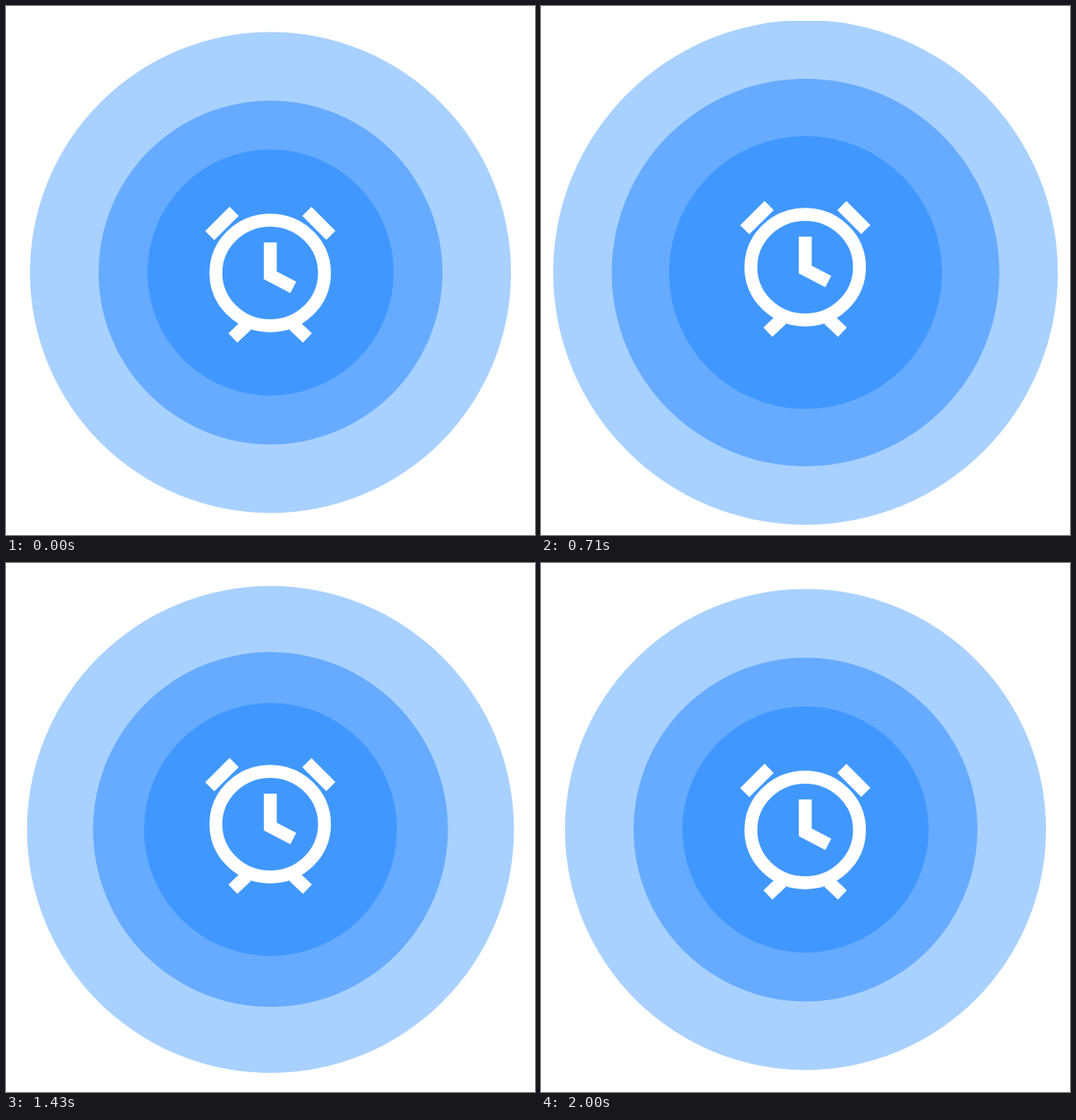
Write an HTML page that moves like this. It is 640 px wide and 640 px high and loops after 3.57 s.

```html
<!DOCTYPE html>
<html lang="en">
<head>
<meta charset="utf-8">
<title>Ringing alarm clock</title>
<style>
  html, body { margin: 0; width: 100%; height: 100%; overflow: hidden; background: #fff; }
  svg { display: block; width: 100%; height: 100%; }
</style>
</head>
<body>
<svg viewBox="0 0 640 640">
  <clipPath id="top"><rect y="18" width="640" height="622"/></clipPath>
  <g id="rings" clip-path="url(#top)">
    <circle cx="320" cy="322.4" fill="#a8d1ff"/>
    <circle cx="320" cy="322.4" fill="#66abff"/>
    <circle cx="320" cy="322.4" fill="#4098ff"/>
  </g>
  <g id="clock" fill="none" stroke="#fff" stroke-width="15.6">
    <ellipse cx="319.6" cy="323" rx="65.7" ry="63.9"/>
    <path d="M319.7 286V325.8L347.6 340.3"/>
    <path d="M274.5 401.7L291 386M364.7 401.7L348.2 386"/>
    <path id="bells" d="M276 248.4L246.5 277.7M364 248.4L393 277.5"/>
  </g>
</svg>
<script>
const LOOP = 3570, STEP = 1000 / 14;
const RADII = [[291, 15], [208, 27.8], [149, 17]]; // rest radius, growth
const rings = document.querySelectorAll('#rings circle');
const clock = document.getElementById('clock');
const bells = document.getElementById('bells');

const clamp = v => Math.max(0, Math.min(1, v));
const pulse = (t, peak) => clamp(1 - Math.abs(t - peak) / 300);
const shaking = (t, start) => {
  const d = t - start;
  return d >= 0 && d < 610 && Math.floor(d / 100) % 2 === 0;
};

function draw(now) {
  // The motion is shown at 14 steps per second
  const t = Math.floor((now % LOOP + 5) / STEP) * STEP;
  const grow = pulse(t, 700) + pulse(t, 1657);
  RADII.forEach(([r, extra], i) => rings[i].setAttribute('r', r + extra * grow));

  const lift = clamp(t / 100) - clamp((t - 1880) / 100);
  clock.setAttribute('transform', `translate(0 ${-7 * lift})`);

  const angle = shaking(t, 400) || shaking(t, 1457) ? 5 : 0;
  bells.setAttribute('transform', `rotate(${angle} 319.6 323)`);
}

let start;
function tick(now) {
  start ??= now;
  draw(now - start);
  requestAnimationFrame(tick);
}
draw(0);
requestAnimationFrame(tick);
</script>
</body>
</html>
```
